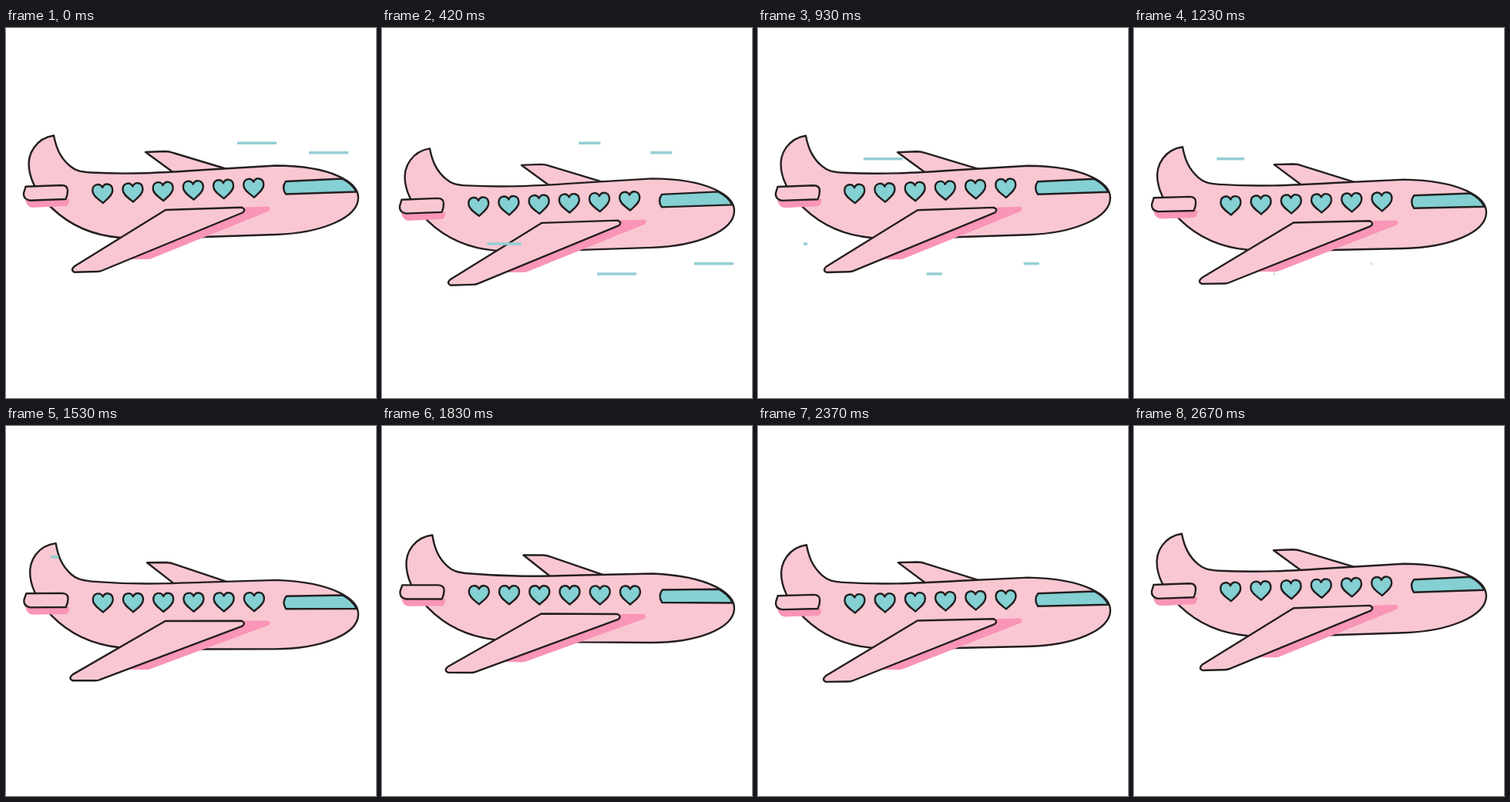
Animation, 480 px wide and 480 px high, one loop 2.7 s. Source, as an HTML page:

```html
<!DOCTYPE html>
<html lang="en">
<head>
<meta charset="utf-8">
<title>Plane</title>
<style>
  html, body { margin: 0; height: 100%; overflow: hidden; background: #fff; }
  svg { display: block; width: 100vw; height: 100vh; }
  #plane { fill: #f9c7d2; stroke: #231f20; stroke-width: 2.4; stroke-linejoin: round; }
  #plane .shade { fill: #f995b7; stroke: none; }
  #plane .glass { fill: #84d0d3; }
  #streaks { stroke: #95cfd3; stroke-width: 3.6; }
</style>
</head>
<body>
<svg viewBox="0 0 480 480">
  <g id="plane">
    <path d="M218 188L181 161L206 160Q212 160 217 162L290 184Z"/>
    <path d="M62 139.5C40 143 27 162 30 183C33 204 46 221 60 234C82 255 112 269 148 272L258 271L350 268C410 266 457 246 457 220C457 201 425 179 350 178.5L258 184C200 188 160 190 110 187.5C96 186.5 90 185 83 179C70 168 65 155 62 139.5Z"/>
    <path class="shade" d="M25 223L82 221.500V225Q81 231 77 231L34 233Q27 232 25 223Z"/>
    <path d="M25.500 205.800L72 204Q80 204 80 211Q80 217 77.500 222L31 223.700Q22 222 23 214Z"/>
    <path class="shade" d="M160 300L240 235L340 231.500Q345 234 341 237.500L190 298.500Q187 300 183 300Z"/>
    <path d="M207 236L306 232.700Q312 236 307 239.500L125 314.500Q122 316 118 316L89 316.800Q83 314 89 309Z"/>
    <path class="glass" d="M363 199L436 195.500Q449 202 454.500 212.500L363 215.500Q357 207 363 199Z"/>
  </g>
  <g id="streaks"></g>
</svg>
<script>
  const LOOP = 2700, STEP = 30, BEAT = 450, STREAK_LIFE = 900;
  const plane = document.getElementById('plane');
  const streakLayer = document.getElementById('streaks');

  function addShape(parent, tag, attributes) {
    const node = document.createElementNS('http://www.w3.org/2000/svg', tag);
    for (const name in attributes) node.setAttribute(name, attributes[name]);
    return parent.appendChild(node);
  }

  const ease = p => (1 - Math.cos(Math.PI * p)) / 2;

  for (let i = 0; i < 6; i++) {
    addShape(plane, 'path', {
      class: 'glass',
      transform: `translate(${125.4 + 39.2 * i} ${214.5 - 1.45 * i}) rotate(-2.2)`,
      d: 'M0-7.500C3-14 13-13 13-3.500C13 3 5 8 0 12.500C-5 8-13 3-13-3.500C-13-13-3-14 0-7.500Z'
    });
  }

  // start time, left edge, height
  const streaks = [
    [0, 300, 149.3], [0, 393, 161.7], [210, 149.5, 280],
    [420, 279, 319], [420, 405, 305.6], [900, 137, 169.8]
  ].map(([start, left, y]) => ({
    start, left, node: addShape(streakLayer, 'line', { y1: y, y2: y })
  }));

  function draw(time) {
    const bob = 17.1 * ease(time / BEAT);
    const pitch = time < 900 ? 0 : 2.2 * ease((time - 900) / 900);
    plane.setAttribute('transform', `translate(0 ${bob}) rotate(${pitch} 16 228)`);

    for (const { start, left, node } of streaks) {
      const p = (time - start) / STREAK_LIFE;
      const visible = p >= 0 && p < 1;
      node.setAttribute('visibility', visible ? 'visible' : 'hidden');
      if (!visible) continue;
      node.setAttribute('x1', left - 100 * ease(p));
      node.setAttribute('x2', left + 51 - 151 * ease(p));
    }
  }

  function tick() {
    const time = performance.now() % LOOP;
    draw(Math.floor(time / STEP) * STEP);
    requestAnimationFrame(tick);
  }
  tick();
</script>
</body>
</html>
```
